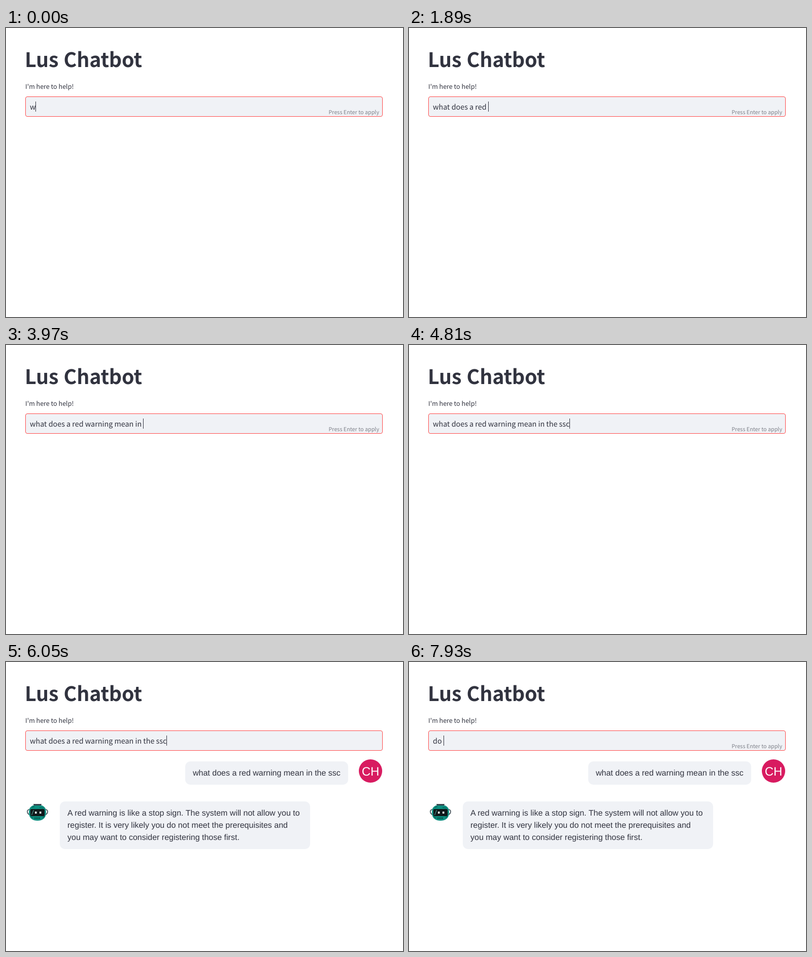
Recreate the animation shown at these times as an HTML page. Size 782 px wide and 570 px high, loop 8000 ms.

```html
<!DOCTYPE html>
<html lang="en">
<head>
<meta charset="utf-8">
<title>Chatbot</title>
<style>
  html, body { margin: 0; width: 100%; height: 100%; overflow: hidden; background: #fff; }
  svg { display: block; width: 782px; height: 570px; }
  text {
    fill: #31333f;
    white-space: pre;
    text-rendering: geometricPrecision;
    font-family: "Noto Sans CJK SC", "Noto Sans CJK JP", "Noto Sans CJK KR", "Noto Sans CJK TC", "Noto Sans CJK", "Open Sans", sans-serif;
  }
  .title { font-size: 39.4px; font-weight: 700; letter-spacing: -0.2px; }
  .label { font-size: 12.54px; }
  .input { font-size: 14.33px; }
  .hint { font-size: 10.75px; fill: #7e8089; text-anchor: end; }
  .chat text { font: 16px "Liberation Sans", Arial, sans-serif; }
  .chat .initials { font-size: 24px; fill: #fff; text-anchor: middle; }
  .panel { fill: #f0f2f6; }
</style>
</head>
<body>
<svg viewBox="0 0 782 570" xmlns="http://www.w3.org/2000/svg">
  <text class="title" x="37" y="76.5">Lus</text>
  <text class="title" x="113.5" y="76.5">Chatbot</text>
  <text class="label" x="38" y="120">I'm here to help!</text>

  <rect class="panel" x="38.5" y="135.5" width="703" height="39" rx="3.5" stroke="#ff4b4b"/>
  <text class="input" id="typed" x="47" y="161" xml:space="preserve"></text>
  <rect id="caret" x="47" y="145" width="1" height="20" fill="#31333f"/>
  <text class="hint" id="hint" x="735" y="170">Press Enter to apply</text>

  <g class="chat" id="chat">
    <rect class="panel" x="353" y="196" width="321" height="46" rx="10"/>
    <text x="368" y="224">what does a red warning mean in the ssc</text>
    <circle cx="718" cy="215" r="23" fill="#d81b60"/>
    <text class="initials" x="718" y="223.5">CH</text>

    <rect class="panel" x="106" y="275" width="493" height="94" rx="10"/>
    <text x="121" y="303">A red warning is like a stop sign. The system will not allow you to</text>
    <text x="121" y="327">register. It is very likely you do not meet the prerequisites and</text>
    <text x="121" y="351">you may want to consider registering those first.</text>

    <g id="robot">
      <path d="M54 280h16l-1 5h-14z" fill="#37474f"/>
      <path d="M47 291q-5 0-5 4t4 6M77 291q5 0 5 4t-4 6" fill="none" stroke="#37474f" stroke-width="1.6"/>
      <path d="M53 283h18q8 3 8 13 0 10-6 14-4 3-11 3t-11-3q-6-4-6-14 0-10 8-13z" fill="#0d8f80"/>
      <path d="M51 287l5-2M66 287l8 1M49 305l5 3M72 307l4-3" stroke="#07685e" stroke-width="1.6"/>
      <rect x="48" y="290" width="28" height="14" rx="2" fill="#10191b"/>
      <path d="M50.5 302l4-10" stroke="#4c8f88" stroke-width="1.2"/>
      <path d="M57 295h3.5v4h-3.5zM66 295h3.5v4h-3.5z" fill="#e4f4f1"/>
      <path d="M56 308h12" stroke="#064d46" stroke-width="3" stroke-dasharray="2 1"/>
    </g>
  </g>
</svg>
<script>
const LOOP = 8000;
const QUESTION = "what does a red warning mean in the ssc";
const el = id => document.getElementById(id);
const [typed, caret, hint, chat] = ["typed", "caret", "hint", "chat"].map(el);

// Typing: time in ms, number of letters of the question
const typing = [
  [0, 1], [210, 3], [420, 5],
  [840, 7], [1050, 9], [1260, 10], [1470, 12], [1680, 14],
  [1890, 16], [2100, 18], [2310, 20], [2520, 22], [2720, 24],
  [3140, 27], [3350, 29], [3560, 31], [3770, 32], [3980, 33], [4180, 36],
  [4390, 38], [4810, 39]
].map(([at, n]) => ({ at, text: QUESTION.slice(0, n), caret: true, hint: true, chat: false }));

// Later changes; each step keeps what it does not name
const steps = [
  { at: 5230, caret: false },
  { at: 5430, hint: false },
  { at: 5850, caret: true },
  { at: 6050, chat: true },
  { at: 6260, caret: false },
  { at: 6890, text: "", caret: true, hint: true },
  { at: 7300, caret: false },
  { at: 7720, text: "do", caret: true },
  { at: 7930, text: "do " }
].reduce((all, step) => [...all, { ...all[all.length - 1], ...step }], typing);

const show = (node, on) => node.setAttribute("visibility", on ? "visible" : "hidden");

function draw(time) {
  const step = steps.filter(s => s.at <= time).pop();
  if (typed.textContent !== step.text) typed.textContent = step.text;
  const width = step.text ? typed.getComputedTextLength() : 0;
  caret.setAttribute("x", Math.round(47 + width - 0.05));
  show(caret, step.caret);
  show(hint, step.hint);
  show(chat, step.chat);
}

const start = performance.now();
function tick() {
  draw((performance.now() - start) % LOOP);
  requestAnimationFrame(tick);
}
draw(0);
requestAnimationFrame(tick);
</script>
</body>
</html>
```
